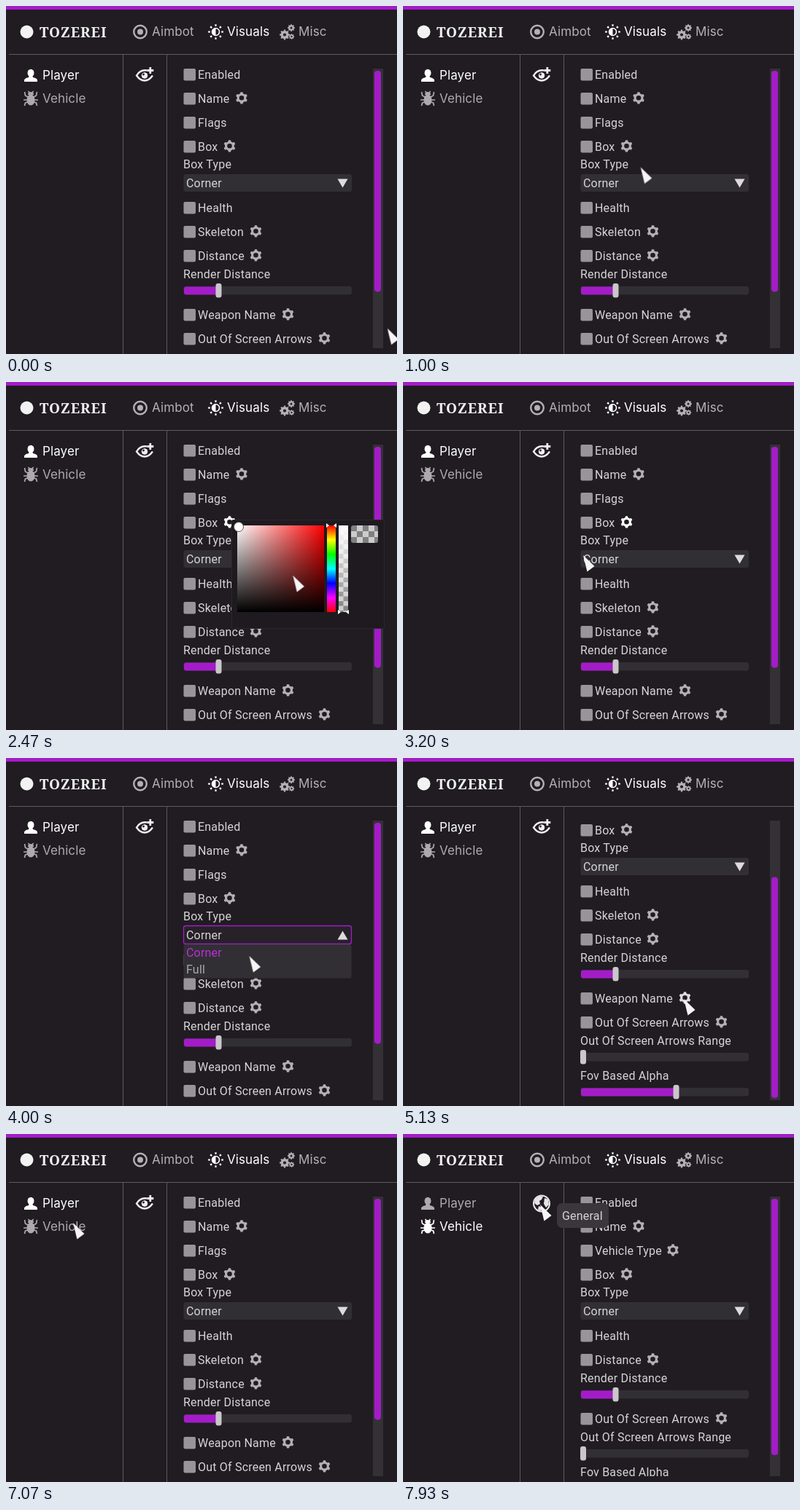
An HTML page for the animation above (8 s loop, 536x478 px).

```html
<!DOCTYPE html>
<html lang="en">
<head>
<meta charset="utf-8">
<title>Settings menu</title>
<style>
  html, body { margin: 0; width: 100%; height: 100%; overflow: hidden; background: #201c22; }
  svg { display: block; width: 536px; height: 478px; }
  text { fill: #d6d4d7; font: 16px Roboto, sans-serif; letter-spacing: .2px; white-space: pre; }
  .nav text { font: 400 17px Inter, sans-serif; letter-spacing: .1px; fill: currentColor; }
  .nav, .gear { color: #b3b1b4; }
  .nav.on { color: #fff; }
  .brand { font: 800 19px "Noto Serif", serif; letter-spacing: 1px; fill: #f2f2f2; }
  .icon { fill: currentColor; }
  .line { fill: none; stroke: currentColor; }
  .gear { fill: currentColor; fill-rule: evenodd; }
  .accent { fill: #a41cc8; }
  .track { fill: #322f34; }
  .knob { fill: #c9c7ca; }

  .scroll, .thumb, .before, .after, .picker, .menu, .tip, .tab-a, .tab-b, .hot-weapon {
    animation: 8s step-end infinite;
  }
  .before { animation-name: before; }
  .after { animation-name: after; }
  .picker { animation-name: picker; }
  .menu { animation-name: menu; }
  .tip { animation-name: tip; }
  .tab-a { animation-name: tab-a; }
  .tab-b { animation-name: tab-b; }
  .scroll { animation-name: scroll; }
  .thumb { animation-name: thumb; }
  .hot-weapon { animation-name: hot-weapon; }
  .hot-box { animation: hot-box 8s linear infinite; }
  .cursor { animation: cursor 8s ease-in-out infinite; }

  @keyframes before { 0% { visibility: visible } 91.2%, 100% { visibility: hidden } }
  @keyframes after { 0% { visibility: hidden } 91.2%, 100% { visibility: visible } }
  @keyframes picker { 0%, 100% { visibility: hidden } 18.8% { visibility: visible } 39.2% { visibility: hidden } }
  @keyframes menu { 0%, 100% { visibility: hidden } 44.9% { visibility: visible } 54.1% { visibility: hidden } }
  @keyframes tip { 0% { visibility: hidden } 98.2%, 100% { visibility: visible } }
  @keyframes tab-a { 0% { color: #fff } 91.2%, 100% { color: #acaaad } }
  @keyframes tab-b { 0% { color: #acaaad } 91.2%, 100% { color: #fff } }
  @keyframes scroll { 0%, 100% { transform: none } 62.5% { transform: translateY(-94px) } 75.1% { transform: none } }
  @keyframes thumb { 0%, 100% { transform: none } 62.5% { transform: translateY(74.5px) } 75.1% { transform: none } }
  @keyframes hot-weapon { 0%, 100% { color: #b3b1b4 } 62.5% { color: #dedcdf } 75.1% { color: #b3b1b4 } }
  @keyframes hot-box { 0%, 15% { color: #b3b1b4 } 17%, 40.2% { color: #fff } 43%, 100% { color: #b3b1b4 } }
  @keyframes cursor {
    0% { transform: translate(523px, 443px); animation-timing-function: ease-out }
    17%, 23.4% { transform: translate(303px, 196px) }
    28.8% { transform: translate(398px, 268px) }
    33.8% { transform: translate(385px, 262px) }
    40%, 43.5% { transform: translate(247px, 238px) }
    50%, 53% { transform: translate(333.5px, 272px) }
    61%, 76.5% { transform: translate(385px, 331px) }
    88.375% { transform: translate(92px, 122px); animation-timing-function: ease-out }
    91%, 93.5% { transform: translate(78px, 126px) }
    99%, 100% { transform: translate(188px, 97px) }
  }
</style>
</head>
<body>
<svg id="stage" viewBox="0 0 536 478"></svg>
<script>
const PURPLE = '#a41cc8';

const rect = (x, y, w, h, attrs = '') => `<rect x="${x}" y="${y}" width="${w}" height="${h}" ${attrs}/>`;
const text = (x, y, s, attrs = '') => `<text x="${x}" y="${y}" ${attrs}>${s}</text>`;

function gear(cx, cy, r = 8, teeth = 6, cls = '', bore = .4) {
  const points = [];
  for (let i = 0; i < teeth; i++) {
    for (const [offset, k] of [[-.3, .78], [-.17, 1], [.17, 1], [.3, .78]]) {
      const a = (i + offset) / teeth * 2 * Math.PI - Math.PI / 2;
      points.push(`${(cx + r * k * Math.cos(a)).toFixed(2)} ${(cy + r * k * Math.sin(a)).toFixed(2)}`);
    }
  }
  const h = r * bore;
  const hole = `M${cx - h} ${cy}a${h} ${h} 0 1 0 ${2 * h} 0a${h} ${h} 0 1 0 ${-2 * h} 0Z`;
  return `<path class="gear ${cls}" d="M${points.join('L')}Z${hole}"/>`;
}
const cog = (cx, cy, r) => gear(cx, cy, r, 8, '', .3);

// Rows are placed by their vertical centre.
const label = (y, s, x = 243) => text(x, y + 5.5, s);
const check = (y, s, gearX, cls) =>
  rect(243.5, y - 8.5, 16.5, 16.5, 'rx="2" fill="#989599"') + label(y, s, 263) +
  (gearX ? gear(gearX, y - 1.2, 8.3, 6, cls) : '');
const slider = (y, x) =>
  rect(243.5, y - 6, 230.5, 11.5, 'rx="3" class="track"') +
  rect(244, y - 5.5, x - 244, 11, 'rx="3" class="accent"') +
  rect(x - 4, y - 10, 8, 19.5, 'rx="3" class="knob"');
const combo = () =>
  rect(243.5, 231, 230.5, 24, 'rx="3" class="track"') + text(247, 249, 'Corner') +
  '<path d="M454.500 237.500H468.500L461.500 249.500Z" fill="#dddbde"/>';
const boxRows = cls => check(193.5, 'Box', 306.5, cls) + label(217.5, 'Box Type') + combo() + check(277.5, 'Health');
const arrowRows = y =>
  check(y, 'Out Of Screen Arrows', 436.5) +
  label(y + 25, 'Out Of Screen Arrows Range') + slider(y + 47.5, 247) +
  label(y + 73, 'Fov Based Alpha') + slider(y + 95.5, 374.5);
const distanceRows = y =>
  check(y, 'Distance', 342.5) + label(y + 25, 'Render Distance') + slider(y + 47.5, 291.5);
const topRows = check(94.5, 'Enabled') + check(127.5, 'Name', 323);

const playerPage = `<g class="before"><g class="scroll">
  ${topRows}${check(160.5, 'Flags')}${boxRows('hot-box')}
  ${check(310.5, 'Skeleton', 342.5)}${distanceRows(343.5)}
  ${check(424.5, 'Weapon Name', 386.5, 'hot-weapon')}${arrowRows(457.5)}
</g></g>`;

const vehiclePage = `<g class="after">
  ${topRows}${check(160.5, 'Vehicle Type', 370)}${boxRows()}
  ${distanceRows(310.5)}${arrowRows(391.5)}
</g>`;

const scrollbar = rect(503, 86, 14, 384, 'fill="#333135"') +
  `<g class="before">${rect(505, 89, 9, 303.5, 'rx="4" class="accent thumb"')}</g>` +
  rect(505, 89, 9, 352, 'rx="4" class="accent after"');

const header = `
  ${rect(0, 0, 536, 5, 'class="accent"')}
  <path d="M4 66.5H536M160.5 67V478M220.5 67V478" stroke="#5d595f"/>
  <circle cx="28.5" cy="35.5" r="9" fill="#f2f2f2"/>
  ${text(46, 42.5, 'TOZEREI', 'class="brand"')}
  <g class="nav">
    <circle class="line" cx="184" cy="35.5" r="8.8" stroke-width="2.4"/>
    <circle class="icon" cx="184" cy="35.5" r="4"/>
    ${text(200, 41, 'Aimbot')}
    ${cog(382, 39.5, 7)}${cog(391, 30, 5)}${cog(391.5, 42, 3.8)}
    ${text(401, 41, 'Misc')}
  </g>
  <g class="nav on">
    <circle class="line" cx="287.5" cy="35.5" r="9" stroke-width="2.6" pathLength="48" stroke-dasharray="2 4" stroke-dashoffset="1"/>
    <circle class="line" cx="287.5" cy="35.5" r="5" stroke-width="1.6"/>
    <path class="icon" d="M287.5 30.5a5 5 0 0 0 0 10Z"/>
    ${text(303, 41, 'Visuals')}
  </g>`;

const sidebar = `
  <g class="nav tab-a">
    <ellipse class="icon" cx="34" cy="92" rx="4.5" ry="5.2"/>
    <path class="icon" d="M25 104V102Q25 99.5 31 98L32 95H36L37 98Q43 99.5 43 102V104Z"/>
    ${text(50, 101, 'Player')}
  </g>
  <g class="nav tab-b">
    <ellipse class="icon" cx="34" cy="129" rx="5.6" ry="7.5"/>
    <path class="icon" d="M30 122a4 4 0 0 1 8 0Z"/>
    <path class="line" stroke-width="1.7" d="M32 119L30.5 117M36 119L37.5 117M30 125L26.5 123L25.5 118M38 125L41.5 123L42.5 118M30 129H24M38 129H44M30 132L26.5 133L25.5 137M38 132L41.5 133L42.5 137"/>
    ${text(50, 133, 'Vehicle')}
  </g>
  <g class="before" fill="none" stroke="#f0eef1" stroke-width="2.4">
    <path d="M193 88.500Q184 87 179 95.500Q184 102.500 190 102.500T201 95.500"/>
    <circle cx="190" cy="95.500" r="3.800" fill="#f0eef1" stroke-width="1"/>
    <circle cx="188.500" cy="94" r="1.400" fill="#201c22" stroke="none"/>
    <path d="M197.800 84V93M193.300 88.500H202.300" stroke-width="2.800"/>
  </g>
  <g class="after">
    <circle cx="190" cy="95.500" r="11" fill="#201c22" stroke="#e6e4e7" stroke-width="2"/>
    <path fill="#e6e4e7" d="M181 90L187 85L192 86L190 90L187 92L188 96L184 98L180 95ZM194 88L199 90L200 97L196 101L193 96ZM186 99L191 101L189 106L185 104Z"/>
  </g>`;

const menu = `<g class="menu">
  ${rect(243.5, 230.5, 230, 25, `rx="3" fill="#262228" stroke="${PURPLE}" stroke-width="1.3"`)}
  ${text(247, 249, 'Corner')}<path d="M454.500 249.500H468.500L461.500 237.500Z" fill="#dddbde"/>
  ${rect(243.5, 256, 230, 46.5, 'rx="2" fill="#322f34"')}
  ${text(247, 273, 'Corner', 'style="fill:#b92fdc"')}
  ${text(247, 296, 'Full', 'style="fill:#a9a7aa"')}
</g>`;

const ramp = (id, stops, axis = 'x1="0" y1="0" x2="0" y2="1"') =>
  `<linearGradient id="${id}" ${axis}>${stops.map(([color, alpha = 1], i) =>
    `<stop offset="${i / (stops.length - 1)}" stop-color="${color}" stop-opacity="${alpha}"/>`).join('')}</linearGradient>`;
const checker = (id, x, y, s) =>
  `<pattern id="${id}" x="${x}" y="${y}" width="${2 * s}" height="${2 * s}" patternUnits="userSpaceOnUse">
    ${rect(0, 0, 2 * s, 2 * s, 'fill="#ccc"')}${rect(0, 0, s, s, 'fill="#808080"')}${rect(s, s, s, s, 'fill="#808080"')}
  </pattern>`;
const marker = (x, y, w) => `<path fill="#fff" d="M${x - 1} ${y - 3}L${x + 3} ${y}L${x - 1} ${y + 3}ZM${x + w + 1} ${y - 3}L${x + w - 3} ${y}L${x + w + 1} ${y + 3}Z"/>`;

const defs = `<defs>
  <clipPath id="panel">${rect(222, 86, 270, 384)}</clipPath>
  ${ramp('white', [['#fff'], ['#fff', 0]], '')}
  ${ramp('black', [['#000', 0], ['#000']])}
  ${ramp('fade', [['#fff'], ['#fff', 0]])}
  ${ramp('hue', ['#f00', '#ff0', '#0f0', '#0ff', '#00f', '#f0f', '#f00'].map(c => [c]))}
  ${checker('fine', 456, 197, 6.5)}${checker('coarse', 473, 197, 8)}
</defs>`;

const picker = `<g class="picker">
  ${rect(309.5, 189.5, 209, 149, 'rx="2" fill="#1e1a20" stroke="#2b272d"')}
  ${['#f00', 'url(#white)', 'url(#black)'].map(f => rect(317, 197, 119, 119, `fill="${f}"`)).join('')}
  ${rect(440, 197, 12, 119, 'fill="url(#hue)"')}
  ${rect(456, 197, 13, 119, 'fill="url(#fine)"')}${rect(456, 197, 13, 119, 'fill="url(#fade)"')}
  ${marker(440, 197, 12)}${marker(456, 316, 13)}
  ${rect(473, 197, 37, 24, 'rx="3" fill="url(#coarse)"')}
</g>`;

const pointer = `<g class="cursor">
  <g class="tip">${rect(23, -2, 71, 34, 'rx="7" fill="#3a363c"')}${text(30, 21, 'General')}</g>
  <path d="M0 0L15.5 15L5.5 22.5Z" fill="#f6f5f6"/>
</g>`;

const pickerDot = '<circle class="picker" cx="319" cy="199" r="6.5" fill="#fff" stroke="#555"/>';

document.getElementById('stage').innerHTML = defs + rect(0, 0, 536, 478, 'fill="#201c22"') + header + sidebar +
  `<g clip-path="url(#panel)">${playerPage}${vehiclePage}</g>` + scrollbar + menu + picker + pointer + pickerDot;
</script>
</body>
</html>
```
